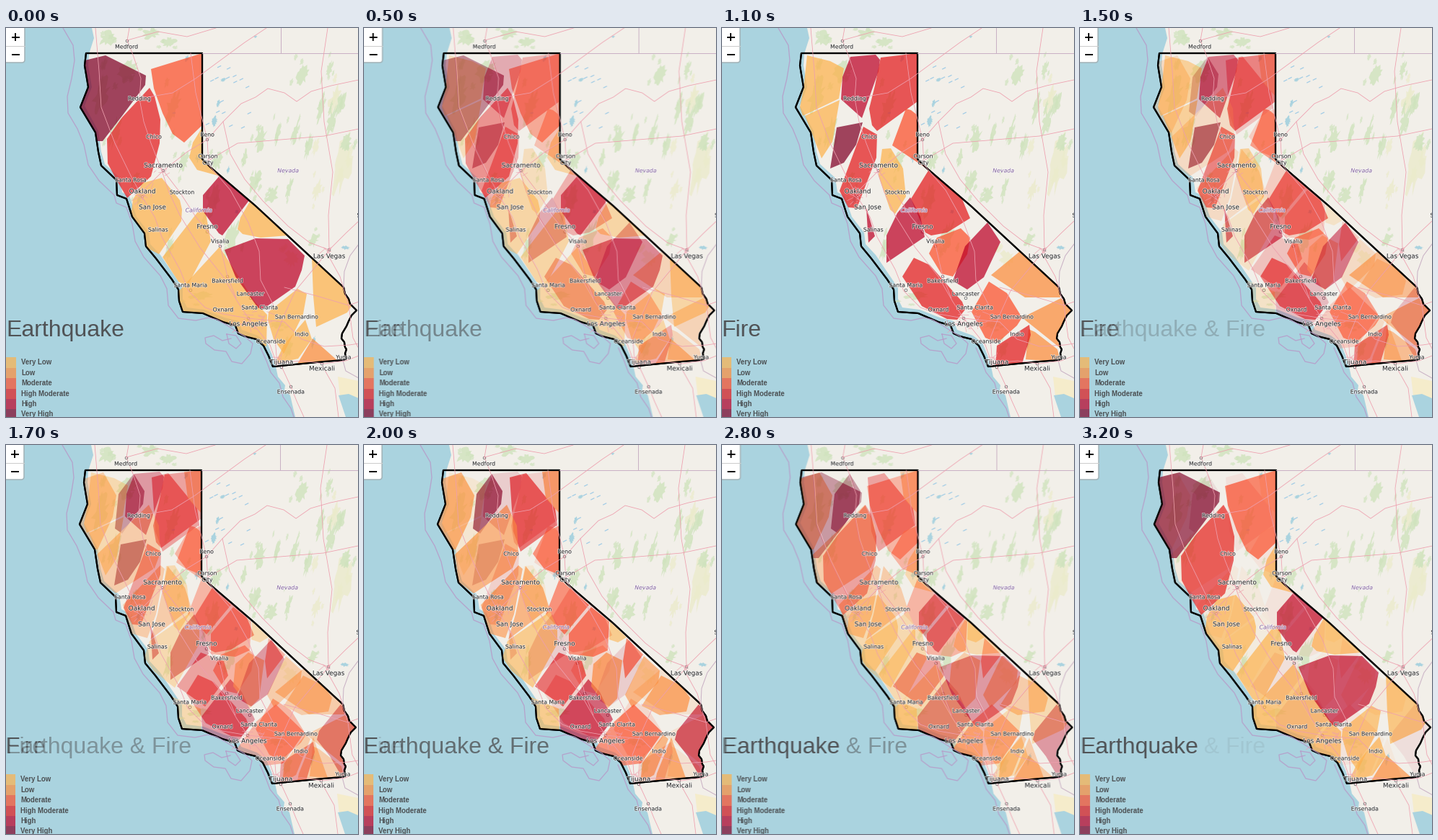
Write a matplotlib script that moves like this. It is 488 by 540 pixels and loops after 3300 ms.

```python
import numpy as np
import matplotlib.pyplot as plt
from matplotlib import patheffects
from matplotlib.animation import FuncAnimation
from matplotlib.patches import Circle, FancyBboxPatch, Polygon, Rectangle

W, H, DPI = 488, 540, 100
PX = 72 / DPI  # points per pixel
HOLD, STEPS = 1, 10
CYCLE = HOLD + STEPS

SEA, LAND, WATER = "#aad3df", "#f2efe9", "#aad3df"
ROAD, BORDER, WOOD, SAND = "#ee9fae", "#b79ac8", "#cfe3bd", "#f5eccb"
RISK = ["#feb24c", "#fd8d3c", "#fc4e2a", "#e31a1c", "#bd0026", "#800026"]
LEVELS = ["Very Low", "Low", "Moderate", "High Moderate", "High", "Very High"]
VL, LO, MO, HM, HI, VH = range(6)


def pts(text):
    """Parse 'x,y x,y ...' into an array of points."""
    return np.array([[float(v) for v in p.split(",")] for p in text.split()])


STATE = pts("110,35 271,35 271,182 282,193 345,247 467,360 469,369 474,376 476,383 "
            "485,392 478,399 474,407 471,414 465,424 464,431 468,436 469,443 471,446 "
            "469,452 471,459 466,461 440,463 369,470 363,455 356,441 346,432 330,428 "
            "321,424 317,413 300,408 272,396 244,394 239,379 238,363 229,349 207,320 "
            "193,303 191,285 174,262 166,237 153,232 152,211 131,191 127,172 123,145 "
            "102,110 113,82 108,52")
COAST = pts("118,0 121,14 114,36 113,52 118,82 108,108 127,143 131,172 136,189 157,208 "
            "160,228 170,233 180,262 197,284 199,300 213,315 234,346 244,361 244,376 "
            "250,388 274,391 302,402 321,407 326,419 348,427 361,437 368,454 373,470 "
            "376,484 386,496 385,503 393,510 400,540 488,540 488,0")
TERRITORY = ["78,0 92,24 94,45 90,70 84,95 85,118 98,140 107,162 113,190 128,212 149,232 "
             "152,243 166,249 174,272 178,296 190,318 213,344 222,362 224,385 238,403 "
             "262,406 280,402 292,405 306,413 318,421 330,428 341,438 338,452 326,466 "
             "312,463 304,449 288,447 276,438 275,430 287,427 299,434 311,431",
             "305,425 318,427 325,438 318,445 308,438 305,425",
             "352,444 360,462 366,478 378,493 383,512 394,528 398,540"]
STATE_LINES = ["271,35 488,35", "380,0 380,35", "467,360 468,338 476,316 488,300",
               "466,461 470,476 488,486"]
ROADS = ["170,0 167,17 176,40 186,70 184,98 190,130 200,160 215,198 225,228 240,260 "
         "268,305 300,345 320,380 335,403 365,440 375,468",
         "217,198 240,228 262,262 279,283 296,302 306,345 318,375",
         "123,0 128,60 131,110 150,160 172,205 188,235 205,262 215,290 240,335 252,365 "
         "275,388 300,397 335,403",
         "188,227 217,198 250,172 278,155 300,130 325,105 345,96 362,84 385,90 402,102 "
         "422,88 450,80 488,72",
         "255,35 262,90 278,155 280,190 310,225 335,270 350,310 352,350 370,385",
         "375,468 372,430 385,398 400,365 425,335 447,308 470,285 488,268",
         "335,403 385,408 409,432 440,442 475,440 488,438",
         "385,360 430,372 474,385 488,380",
         "375,465 410,462 440,466 470,462 488,455",
         "300,130 310,175 330,210 355,240 390,275 420,298 447,308",
         "445,0 436,60 440,130 452,200 446,260 447,308",
         "278,185 320,160 380,155 440,150 488,140",
         "381,470 394,498 402,518 412,540", "437,468 455,500 460,540",
         "167,17 210,5 250,12 290,0", "184,98 230,90 262,70 330,20 360,0",
         "447,318 462,345 474,385 480,430 488,445"]

# x, y, half width, half height
WOODS = [(410, 65, 9, 16), (447, 58, 5, 14), (436, 112, 6, 22), (450, 130, 6, 24),
         (462, 108, 7, 22), (400, 145, 5, 18), (418, 165, 5, 20), (352, 155, 8, 18),
         (376, 146, 4, 18), (330, 180, 4, 14), (344, 214, 9, 18), (368, 232, 9, 14),
         (392, 222, 4, 16), (470, 160, 8, 16), (425, 295, 8, 10), (292, 185, 8, 14),
         (200, 8, 14, 8), (140, 15, 12, 12), (225, 20, 12, 8), (130, 95, 11, 28),
         (150, 145, 9, 24), (168, 60, 14, 18), (230, 110, 10, 26), (245, 185, 8, 18),
         (285, 240, 10, 26), (312, 290, 9, 24), (225, 305, 6, 20), (270, 372, 18, 6),
         (375, 412, 14, 6), (390, 445, 6, 14), (178, 210, 6, 12)]
SANDS = [(466, 190, 15, 45), (430, 225, 6, 16), (455, 100, 9, 22), (395, 320, 12, 14)]
LAKES = [(288, 130, 5, 9), (293, 105, 3, 6), (265, 180, 4, 7), (307, 197, 2, 6),
         (319, 255, 3, 3), (425, 436, 3, 9), (470, 305, 7, 3), (184, 236, 3, 10),
         (250, 42, 3, 5), (232, 118, 3, 2), (300, 72, 4, 3), (345, 12, 3, 2)]

SMALL, BIG = 7.8, 8.9
CITIES = [("Medford", 166, 26), ("Redding", 184, 98), ("Chico", 204, 151),
          ("Reno", 278, 148), ("Carson", 279, 178), ("City", 279, 187),
          ("Santa Rosa", 172, 211), ("Stockton", 243, 228), ("Salinas", 210, 280),
          ("Visalia", 296, 296), ("Bakersfield", 306, 351), ("Santa Maria", 255, 357),
          ("Lancaster", 338, 369), ("Oxnard", 300, 391), ("Santa Clarita", 351, 388),
          ("San Bernardino", 402, 401), ("Indio", 409, 425), ("Oceanside", 366, 435),
          ("Yuma", 467, 457), ("Ensenada", 394, 505), ("St. George", 506, 260)]
METROS = [("Sacramento", 217, 191), ("Oakland", 188, 227), ("San Jose", 202, 249),
          ("Fresno", 278, 276), ("Los Angeles", 335, 411), ("Tijuana", 381, 464),
          ("Mexicali", 437, 473), ("Las Vegas", 447, 317)]
DOTS = pts("167,18 278,155 217,198 278,283 296,303 306,345 335,403 447,308 381,471 394,498 "
           "338,375 437,466 188,234 255,364")

QUAKE = [
    (VH, "108,45 137,38 193,66 192,79 160,122 133,157 125,157 95,109"),
    (MO, "200,57 271,35 271,135 246,159 230,147 216,118 204,84"),
    (HM, "198,83 205,95 213,127 212,160 200,206 188,217 167,236 154,214 140,188 139,154 160,124"),
    (VL, "271,138 273,181 297,206 264,197 253,180 258,159"),
    (VL, "189,215 215,208 240,239 243,252 242,268 211,314 190,303 186,285 172,262 175,238"),
    (VL, "269,250 276,257 283,296 250,359 238,352 216,318"),
    (VL, "295,304 344,380 361,398 360,442 325,430 300,415 240,398 236,368"),
    (VL, "363,394 403,362 416,369 411,397 384,452 370,432 362,405"),
    (VL, "414,405 423,432 404,459 372,466 384,440"),
    (LO, "424,431 459,462 403,466"),
    (VL, "423,318 467,359 480,383 472,395 429,415 425,372"),
    (HI, "297,203 337,238 299,288 294,285 272,254 272,232"),
    (VL, "337,241 390,288 352,291 327,286 320,279 324,263"),
    (HI, "302,308 345,292 390,293 413,316 409,336 400,359 354,391 348,388 317,345"),
]
FIRE = [
    (VL, "118,38 150,46 169,56 162,98 112,122 108,110 113,84"),
    (VL, "115,122 163,100 153,158 138,181 125,147"),
    (HI, "178,40 213,37 219,44 217,60 194,125 165,99 167,68"),
    (HM, "220,41 271,35 271,102 215,143 208,135 204,112 212,80"),
    (VH, "159,138 195,131 186,162 169,187 150,195"),
    (HM, "196,137 215,148 214,180 187,250 175,249 163,226"),
    (MO, "255,112 262,114 271,121 271,184 288,198 236,163"),
    (VL, "222,168 234,167 251,195 255,234 240,258 233,252 217,205"),
    (HM, "286,198 331,233 344,264 312,284 290,288 282,284 262,237"),
    (HI, "261,235 275,262 281,290 228,326 228,288 243,257"),
    (HI, "200,249 212,289 203,298"),
    (HM, "266,319 288,329 333,380 337,391 326,405 312,404 277,386 250,345"),
    (MO, "331,278 344,291 340,314 320,345 304,341 287,313 298,291"),
    (HI, "368,270 386,297 363,346 340,363 320,351 337,303"),
    (LO, "413,310 467,359 469,374 420,374 373,343"),
    (LO, "470,375 488,392 474,408 463,430 471,446 416,402"),
    (LO, "425,418 434,422 465,446 468,458 462,463 421,460"),
    (MO, "370,352 395,368 416,402 409,413 382,437 365,430 346,394"),
    (HM, "426,412 428,426 416,466 379,470 381,441"),
]
BOTH = [
    (LO, "105,48 135,38 153,70 148,100 127,145 120,145 95,110"),
    (VH, "177,40 192,64 190,82 161,123 151,116 156,68"),
    (HM, "202,45 225,39 265,88 268,111 217,148 207,120"),
    (LO, "247,37 271,35 271,95 252,74"),
    (LO, "198,83 212,112 214,150 206,171 152,206 131,190 126,152"),
    (LO, "214,167 220,172 208,235 196,268 175,262 162,222"),
    (LO, "224,168 248,198 257,226 200,270 210,235"),
    (MO, "252,120 271,112 271,180 250,172 234,151"),
    (MO, "271,186 312,222 278,263 252,235"),
    (MO, "315,225 340,245 338,285 318,294 284,290 284,262"),
    (VL, "341,245 364,267 352,274 340,270"),
    (VL, "258,231 268,254 268,276 234,337 205,314 192,295 199,272"),
    (HM, "270,288 302,300 308,320 276,363 237,335"),
    (HI, "311,325 327,343 345,381 320,414 298,410 272,394 271,377"),
    (VL, "229,349 270,366 271,397 242,395 236,378"),
    (LO, "336,288 358,299 351,352 338,365 315,335 318,304"),
    (MO, "364,268 387,291 362,324 359,300"),
    (LO, "388,293 410,313 408,330 372,365 362,347"),
    (LO, "412,320 440,334 452,351 447,370 410,375 385,362"),
    (MO, "347,384 374,360 414,399 384,442 360,445 320,422"),
    (LO, "415,402 422,408 402,458 383,469 386,441"),
    (LO, "426,406 446,462 404,466 406,456"),
    (HI, "464,360 488,392 474,408 463,431 473,446 467,463 449,432 431,409 434,397"),
]
# title, zones, horizontal nudge of the whole view
VIEWS = [("Earthquake", QUAKE, 1), ("Fire", FIRE, 0), ("Earthquake & Fire", BOTH, 0)]


def blob(rng, x, y, rx, ry, tilt=0.25):
    """Ragged ellipse leaning to the right."""
    a = np.linspace(0, 2 * np.pi, 26, endpoint=False)
    r = rng.uniform(0.45, 1.1, a.size)
    u, v = rx * r * np.cos(a), ry * r * np.sin(a)
    return np.column_stack([x + u - tilt * v, y + v])


def fill(ax, points, color, **kw):
    return ax.add_patch(Polygon(points, fc=color, lw=0, **kw))


def stroke(ax, points, color, width, **kw):
    ax.plot(*np.transpose(points), color=color, lw=width * PX, **kw)


def label(ax, text, x, y, size, color="#333333", family="DejaVu Sans", halo=True,
          ha="center", va="center", **kw):
    t = ax.text(x, y, text, fontsize=size * PX, color=color, family=family,
                ha=ha, va=va, clip_on=True, **kw)
    if halo:
        t.set_path_effects([patheffects.withStroke(linewidth=1.6 * PX,
                                                   foreground="#ffffffa0")])


def draw_terrain(ax, rng):
    fill(ax, COAST, LAND)
    for spots, color in ((SANDS, "#ebebcb"), (WOODS, WOOD)):
        for x, y, rx, ry in spots:
            fill(ax, blob(rng, x, y, rx, ry), color, alpha=0.8)
            for _ in range(3):
                dx, dy = rng.normal(0, (rx, ry))
                fill(ax, blob(rng, x + dx, y + dy, rx / 3, ry / 3), color, alpha=0.7)
    fill(ax, pts("459,484 488,490 488,515 474,509 462,511"), SAND)
    fill(ax, pts("460,510 474,508 488,514 488,540 470,540"), WATER)
    for lake in LAKES:
        fill(ax, blob(rng, *lake), WATER)
    for x, y in rng.uniform((275, 50), (345, 150), (16, 2)):
        stroke(ax, [(x, y), (x + 4, y - 2)], "#9fcbe6", 1.2)


def draw_lines(ax, rng):
    for line in TERRITORY:
        stroke(ax, pts(line), BORDER, 1.3, alpha=0.85)
    for line in STATE_LINES:
        stroke(ax, pts(line), "#c9b0c4", 1)
    for line in ROADS:
        stroke(ax, pts(line), ROAD, 0.8)
    # street webs around the big cities
    for cx, cy, spread, n in ((340, 405, 15, 26), (190, 236, 9, 14), (217, 198, 7, 8),
                              (376, 458, 5, 7), (447, 310, 5, 6)):
        for x, y in rng.normal((cx, cy), (spread, spread * 0.5), (n, 2)):
            dx, dy = rng.normal(0, 6, 2)
            stroke(ax, [(x, y), (x + dx, y + dy)], ROAD, 0.6)


def draw_labels(ax):
    for x, y in DOTS:
        ax.add_patch(Circle((x, y), 1.8, fc="white", ec="#666666", lw=0.8 * PX))
    for name, x, y in CITIES:
        label(ax, name, x, y, SMALL)
    for name, x, y in METROS:
        label(ax, name, x, y, BIG)
    for name, x, y in (("California", 266, 253), ("Nevada", 390, 198)):
        label(ax, name, x, y, SMALL, "#8d6fa5", style="italic")


def draw_zones(ax, zones):
    border = Polygon(STATE, fc="none", ec="black", lw=2.2 * PX, joinstyle="round")
    ax.add_patch(border)
    for level, shape in zones:
        fill(ax, pts(shape), RISK[level], alpha=0.72).set_clip_path(border)
    ax.add_patch(Polygon(STATE, fc="none", ec="black", lw=2.2 * PX, joinstyle="round"))


def draw_controls(ax, title):
    ax.add_patch(FancyBboxPatch((-8, -8), 33, 56, boxstyle="round,pad=0,rounding_size=4",
                                fc="white", ec="#a3b4b9", lw=1.6 * PX, zorder=4))
    stroke(ax, [(-2, 24.5), (25, 24.5)], "#cccccc", 1, zorder=5)
    stroke(ax, [(7.5, 12.5), (17, 12.5)], "black", 1.9, zorder=5)
    stroke(ax, [(12.25, 7.7), (12.25, 17.3)], "black", 1.9, zorder=5)
    stroke(ax, [(7.5, 37), (17, 37)], "black", 1.9, zorder=5)

    label(ax, title, -1, 428, 32, "#505356", "Liberation Sans", False, "left", "baseline")
    for i, (name, color) in enumerate(zip(LEVELS, RISK)):
        y = 457.4 + 14.4 * i
        ax.add_patch(Rectangle((-2, y), 15, 14.4, fc=color, alpha=0.7, lw=0))
        label(ax, name, 20, y + 10, 9.6, "#4b4f52", "Liberation Sans", False,
              "left", "baseline", weight="bold")


def render(title, zones, nudge):
    """Draw one complete view and return it as an RGB array."""
    fig.clear()
    ax = fig.add_axes([0, 0, 1, 1])
    ax.set(xlim=(-nudge, W - nudge), ylim=(H, 0))
    ax.axis("off")
    rng = np.random.default_rng(7)
    draw_terrain(ax, rng)
    draw_lines(ax, rng)
    draw_labels(ax)
    draw_zones(ax, zones)
    draw_controls(ax, title)
    fig.canvas.draw()
    return np.array(fig.canvas.buffer_rgba())[..., :3].astype(float)


fig = plt.figure(figsize=(W / DPI, H / DPI), dpi=DPI, facecolor=SEA)
views = [render(*view) for view in VIEWS]

fig.clear()
stage = fig.add_axes([0, 0, 1, 1])
stage.axis("off")
picture = stage.imshow(views[0].astype(np.uint8), aspect="auto", interpolation="nearest")


def update(n):
    i, step = divmod(n, CYCLE)
    t = max(0, step - HOLD) / STEPS
    mix = (1 - t) * views[i] + t * views[(i + 1) % len(views)]
    picture.set_data(np.rint(mix).astype(np.uint8))
    return [picture]


anim = FuncAnimation(fig, update, frames=CYCLE * len(VIEWS), interval=100,
                     repeat=True, repeat_delay=0)
plt.show()
```
